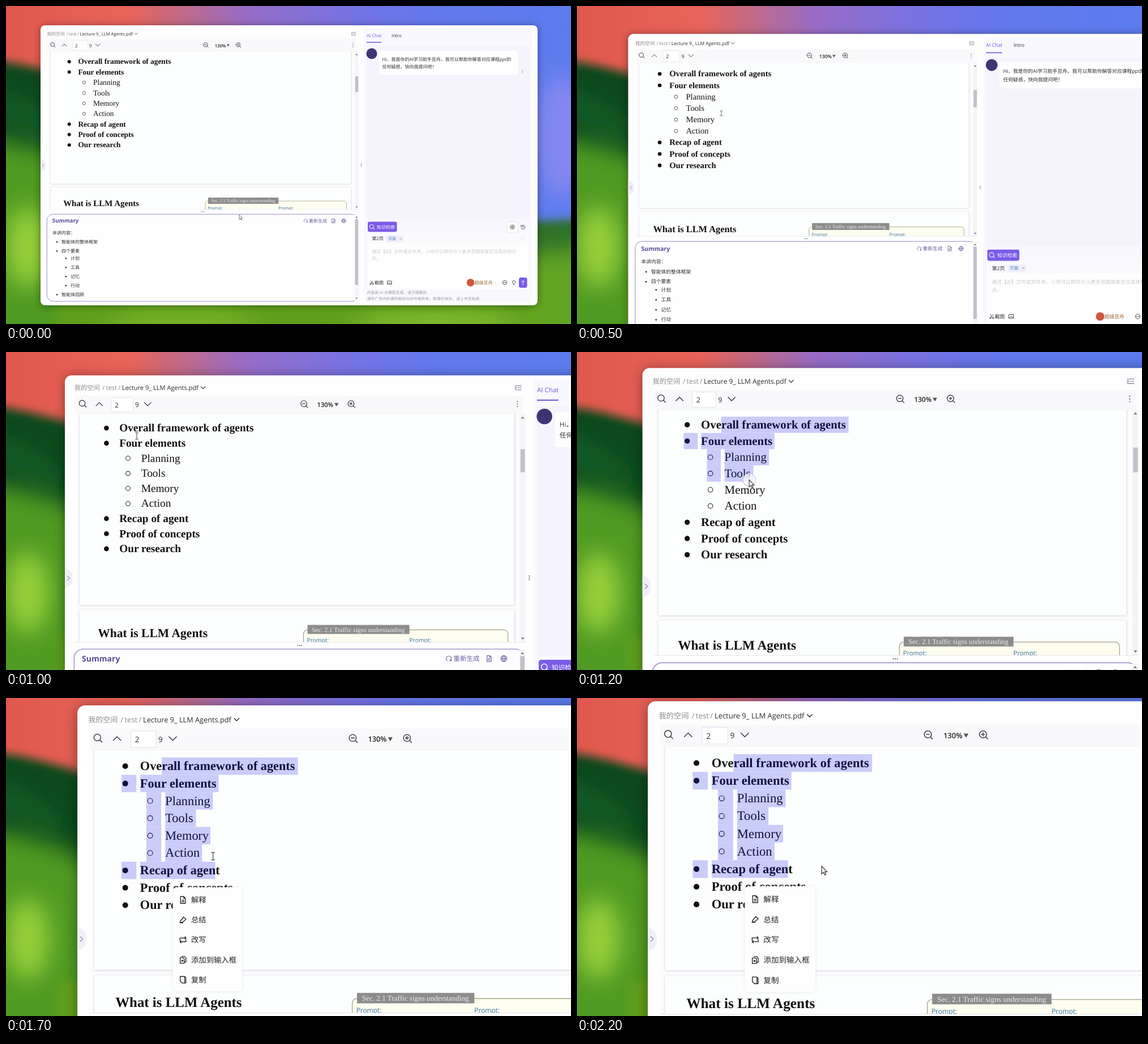
Recreate the animation shown at these times as an HTML page. Size 998 by 561 pixels, loop 2300 ms.

```html
<!DOCTYPE html>
<html lang="zh-CN">
<head>
<meta charset="utf-8">
<title>Reader zoom</title>
<style>
  html, body { margin: 0; width: 100%; height: 100%; overflow: hidden; background: #5f9e1c; }
  svg { position: absolute; left: 0; top: 0; width: 998px; height: 561px; }
  text { white-space: pre; text-rendering: geometricPrecision; }
  .ui { font-family: "Open Sans", "Noto Sans CJK SC", "Noto Sans CJK", sans-serif; }
  .page { font-family: "Liberation Serif", "Times New Roman", serif; fill: #111; }
  .icon { fill: none; stroke-linecap: round; stroke-linejoin: round; }
</style>
</head>
<body>
<svg viewBox="0 0 998 561">
  <defs>
    <linearGradient id="sky">
      <stop offset="0" stop-color="#e0584d"/>
      <stop offset=".22" stop-color="#e8645a"/>
      <stop offset=".32" stop-color="#bd6a8c"/>
      <stop offset=".42" stop-color="#996cc4"/>
      <stop offset=".6" stop-color="#7872e2"/>
      <stop offset=".75" stop-color="#6278ec"/>
      <stop offset="1" stop-color="#5c7cee"/>
    </linearGradient>
    <filter id="b8" x="-50%" y="-50%" width="200%" height="200%"><feGaussianBlur stdDeviation="8"/></filter>
    <filter id="b20" x="-80%" y="-80%" width="260%" height="260%"><feGaussianBlur stdDeviation="20"/></filter>
  </defs>
  <rect width="998" height="561" fill="url(#sky)"/>
  <path d="M-60 92Q60 98 240 170V640H-60Z" fill="#0c4a1f" filter="url(#b8)"/>
  <path d="M-60 150Q40 150 110 235L60 235Q20 190 -60 185Z" fill="#14602a" filter="url(#b20)"/>
  <path d="M-60 235Q50 230 190 310V640H-60Z" fill="#4f9a20" filter="url(#b20)"/>
  <ellipse cx="38" cy="425" rx="38" ry="72" fill="#96d03a" filter="url(#b20)"/>
  <ellipse cx="985" cy="230" rx="50" ry="110" fill="#8487f0" filter="url(#b20)"/>
  <path d="M860 375Q950 385 1060 370V640H860Z" fill="#2f6f2c" filter="url(#b8)"/>
  <path d="M860 440Q950 440 1060 420V640H860Z" fill="#62a524" filter="url(#b20)"/>
  <rect x="90" y="500" width="830" height="120" fill="#5f9e1c" filter="url(#b8)"/>
  <ellipse cx="310" cy="560" rx="130" ry="18" fill="#80b92c" filter="url(#b20)"/>
  <ellipse cx="760" cy="560" rx="150" ry="18" fill="#8ac234" filter="url(#b20)"/>
</svg>
<svg viewBox="0 0 998 561">
  <defs>
    <clipPath id="viewer"><rect x="70" y="81" width="556" height="278"/></clipPath>
    <clipPath id="foot"><rect x="633" y="498" width="300" height="21.5"/></clipPath>
    <filter id="soft" x="-20%" y="-20%" width="140%" height="140%"><feGaussianBlur stdDeviation="1.4"/></filter>
    <filter id="drop" x="-10%" y="-10%" width="120%" height="120%"><feGaussianBlur stdDeviation="7"/></filter>
  </defs>
  <g id="win"></g>
</svg>
<script>
const LOOP = 2300;
const ROW_H = 18.375, ROW_Y = 98;
const PURPLE = "#7b5ce8", VIOLET = "#6d62a0", INK = "#2c2c34", GRAY = "#8b8b92";

// markup helpers; text is placed by its vertical centre
const text = (x, y, s, size = 8, fill = INK, more = "") =>
  `<text class="ui" x="${x}" y="${y + size * .36}" font-size="${size}" fill="${fill}" ${more}>${s}</text>`;
const serif = (x, y, s, size, more = "") =>
  `<text class="page" x="${x}" y="${y}" font-size="${size}" ${more}>${s}</text>`;
const box = (x, y, w, h, fill, more = "") =>
  `<rect x="${x}" y="${y}" width="${w}" height="${h}" fill="${fill}" ${more}/>`;
const dot = (x, y, r, fill = INK, more = "") =>
  `<circle cx="${x}" cy="${y}" r="${r}" fill="${fill}" ${more}/>`;
const icon = (x, y, d, color = INK, width = .8) =>
  `<path class="icon" transform="translate(${x} ${y})" d="${d}" stroke="${color}" stroke-width="${width}"/>`;
const dots = (x, y, dx, dy, color = "#666") =>
  [-1, 0, 1].map(k => dot(x + k * dx, y + k * dy, .7, color)).join("");
const arc = r => `M${-r} 0a${r} ${r} 0 1 1 ${2 * r} 0a${r} ${r} 0 1 1 ${-2 * r} 0`;
const MEDIUM = `font-weight="500"`, BOLD = `font-weight="700"`;

const ICON = {
  down: "M-2.6 -1.3L0 1.3L2.6 -1.3",
  bigDown: "M-4 -2L0 2L4 -2",
  bigUp: "M-4 2L0 -2L4 2",
  right: "M-1.5 -2.6L1.5 0L-1.5 2.6",
  find: "M-4 -.6a3.6 3.6 0 1 1 7.2 0a3.6 3.6 0 1 1 -7.2 0M2.3 2L4.6 4.3",
  doc: "M-2.6 -3.6H.8L2.6 -1.8V3.6H-2.6ZM.8 -3.6V-1.8H2.6M-1.2 .2H1.2M-1.2 1.8H1.2",
  globe: arc(3.6) + "M-3.6 0H3.6M0 -3.6Q-3.4 0 0 3.6Q3.4 0 0 -3.6",
  redo: "M-1.8 2.6A3.1 3.1 0 1 1 1.8 2.6M1.8 2.6L3.3 2.4M1.8 2.6L1.7 1",
  list: "M-3.8 -2.5H3.8M-3.8 2.5H3.8M-.6 0H3.8M-3.8 -.9L-2 0L-3.8 .9",
  cross: "M-1.5 -1.5L1.5 1.5M1.5 -1.5L-1.5 1.5",
  clock: "M-3.2 -1.5A3.6 3.6 0 1 1 -3.2 1.7M-3.6 -2.8L-3.2 -1.3L-1.7 -1.6M0 -1.8V.3H1.6",
  image: "M-3.6 -2.9H3.6V2.9H-3.6ZM-3.2 2.2L-.8 -.2L.8 1.3L1.8 .4L3.4 2",
  bulb: "M-1.1 1.8Q-2.6 .4 -2.6 -1A2.6 2.6 0 0 1 2.6 -1Q2.6 .4 1.1 1.8ZM-1 3.5H1",
  cut: "M-2.2 -3L1.6 2M2.2 -3L-1.6 2M-1.3 2.4a1 1 0 1 1 -2 0a1 1 0 1 1 2 0M3.3 2.4a1 1 0 1 1 -2 0a1 1 0 1 1 2 0",
  pen: "M-3.4 3H-.2M-2.8 1.2L.6 -3L3.2 -.7L-.4 2.4L-2.8 2.6Z",
  swap: "M-3.2 .4V-2H3.2M2 -3.2L3.2 -2L2 -.8M3.2 -.4V2H-3.2M-2 .8L-3.2 2L-2 3.2",
  paste: "M-1.4 -3.6H1.6L3.2 -2V2.2H1.4M-3 -2.2H.2L1.4 -1V3.6H-3ZM-1.6 1H.2M-.7 .1V1.9",
  copy: "M-2.9 -3.5H1.8V3.5H-.6L-2.9 1.4ZM1.8 -2.8H3V3.5H.6",
  send: "M0 3.6V-3.4M-2.7 -.8L0 -3.5L2.7 -.8"
};

// outline rows: label, sub level, right edge of a full highlight
const ROWS = [
  ["Overall framework of agents", 0, 294.5],
  ["Four elements", 0, 210.5],
  ["Planning", 1, 204.4],
  ["Tools", 1, 186.6],
  ["Memory", 1, 201.9],
  ["Action", 1, 193],
  ["Recap of agent", 0, 214.2],
  ["Proof of concepts", 0, 225.8],
  ["Our research", 0, 196]
];
const rowY = i => ROW_Y + i * ROW_H;

function outline() {
  return ROWS.map(([label, sub], i) => {
    const y = rowY(i);
    return sub
      ? dot(138, y + .2, 2.7, "none", `stroke="#222" stroke-width=".7"`) + serif(154, y + 4.4, label, 13.4)
      : dot(111.7, y + .2, 3, "#111") + serif(127.4, y + 4.4, label, 13.33, BOLD);
  }).join("");
}

function highlight(last, edge) {
  if (last < 0) return "";
  return ROWS.slice(0, last + 1).map(([, sub, full], i) => {
    const y = rowY(i) - 9, x0 = i ? (sub ? 154 : 127.5) : 150.3;
    const end = i === last ? Math.min(edge, full) : full;
    const mark = i ? box(sub ? 134 : 107.7, y, 15.8, ROW_H, "#1010e8") : "";
    return mark + box(x0, y, Math.max(0, end - x0), ROW_H, "#1010e8");
  }).join("");
}

function header() {
  const zoom = (x, plus) => icon(x, 69, "M-4.2 -.6a3.7 3.7 0 1 1 7.4 0a3.7 3.7 0 1 1 -7.4 0M2.2 2L4.4 4.2M-2.2 -.6H1.2" + (plus ? "M-.5 -2.3V1.1" : ""));
  return text(72.5, 49, "我的空间", 7.8, GRAY) + text(106.8, 49, "/", 7.8, GRAY) +
    text(111, 49, "test", 7.8, GRAY) + text(126, 49, "/", 7.8, GRAY) +
    text(130.5, 49, "Lecture 9_ LLM Agents.pdf", 7.65) + icon(229.6, 49, ICON.down) +
    icon(614, 49, ICON.list, "#77738f", .7) +
    box(74, 58.5, 546, 22.5, "#f9f9fb") +
    icon(82.5, 68.5, ICON.find) + icon(103, 69, ICON.bigUp) +
    box(117.5, 61, 26.8, 17.5, "#fff", `rx="1.5" stroke="#e0e0ea" stroke-width=".6"`) +
    text(122, 70.2, "2", 8) + text(146.7, 69.8, "9", 8) + icon(162, 69, ICON.bigDown) +
    zoom(353, false) + text(368.7, 69.8, "130%", 7.7, "#222", `font-weight="600"`) +
    `<path d="M389.8 67.6h5l-2.5 4.2z" fill="#555"/>` + zoom(410.5, true) + dots(613, 69, 0, 3);
}

function scrollbar(x, top, bottom, y0, y1) {
  return box(x, top, 7, bottom - top, "#f5f5f8") + box(x + 1, y0, 5.4, y1 - y0, "#c2c1ca") +
    `<path d="M${x + 1.7} ${top + 5.6}h4l-2-2.6zM${x + 1.7} ${bottom - 5.6}h4l-2 2.6z" fill="#777"/>`;
}

function viewer() {
  const sheet = (y, h) => box(79, y + .5, 530.5, h, "#cfcfdc", `filter="url(#soft)"`) + box(79, y, 530, h, "#fdfffe");
  return `<g clip-path="url(#viewer)">` + box(74, 81, 544, 278, "#fdfdfe") +
    sheet(60, 253.6) + sheet(319.5, 80) +
    outline() + `<g id="sel" opacity=".21"></g>` +
    serif(101.2, 352.8, "What is LLM Agents", 14.93, BOLD) +
    box(352, 344, 249.5, 40, "#fdfdf0", `rx="5" stroke="#a3a384" stroke-width=".8"`) +
    box(357, 338, 124.3, 11, "#8c8c8c") +
    serif(362.3, 346.4, "Sec. 2.1 Traffic signs understanding", 7.88, `style="fill:#ececec"`) +
    text(356.3, 356.4, "Prompt:", 7.1, "#34709e") + text(481.3, 356.4, "Prompt:", 7.1, "#34709e") +
    scrollbar(615.8, 81, 359, 124, 152) + `</g>` +
    box(74, 358.8, 549, .6, "#e3e3ec") + dots(347.5, 363, 2.3, 0);
}

function summary() {
  const items = [[0, 416, "智能体的整体框架"], [0, 432, "四个要素"], [1, 445, "计划"], [1, 461, "工具"],
    [1, 477, "记忆"], [1, 493, "行动"], [0, 509, "智能体回顾"]];
  return box(72.3, 367.4, 549.5, 153.6, "#fefefe", `rx="11" stroke="#9288c4" stroke-width=".9"`) +
    scrollbar(615.5, 368, 520, 376, 492) +
    text(81.8, 379, "Summary", 9.7, "#5d4a9e", BOLD) +
    icon(529.3, 379, ICON.redo, VIOLET) + text(535, 379, "重新生成", 8, VIOLET) +
    icon(578.5, 379, ICON.doc, VIOLET) + icon(596.5, 379, ICON.globe, VIOLET) +
    text(82, 400, "本讲内容：") +
    items.map(([sub, y, s]) => dot(90 + 16 * sub, y + .3, 1.3) + text(98 + 16 * sub, y, s)).join("");
}

function chat() {
  const ask = "#c9c9cf", note = "#9c9ca4";
  return box(633, 39, 295, 484, "#f9f8fe", `rx="4"`) + box(637, 72, 288, 304, "#f5f4fd") +
    text(637, 52, "AI Chat", 7.9, "#6f5ce0") + box(637, 63.4, 26, 1.5, "#6f5ce0") + text(681, 52, "Intro", 7.9) +
    dot(646, 84, 9.5, "#3d3474") +
    box(658.8, 79, 245.5, 42.5, "#fefefe", `rx="3"`) +
    text(664.5, 94, "Hi，我是你的AI学习助手豆舟。我可以帮助你解答对应课程ppt的", 8, INK, MEDIUM) +
    text(664.5, 107, "任何疑惑，快向我提问吧！", 8, INK, MEDIUM) + dots(912.5, 115, 0, 2.3, "#888") +
    box(639, 380.5, 51.5, 18, PURPLE, `rx="3"`) + icon(646.2, 389.7, ICON.find, "#fff", 1) +
    text(655, 389.7, "知识检索", 8, "#fff", MEDIUM) +
    box(885, 380, 19.5, 20, "#fefefe", `rx="4" stroke="#dcdae8" stroke-width=".7"`) +
    icon(894.5, 390, arc(3.6) + "M-1.8 0H1.8M0 -1.8V1.8") + icon(913, 390, ICON.clock) +
    box(639, 402, 283, 97.5, "#fefefe", `rx="3"`) + box(641, 402.5, 279, 16.5, "#fafafd") +
    text(646.5, 410.5, "第2页") + box(672, 404.5, 30, 12, "#f0effa", `rx="2"`) +
    text(675, 410.5, "页面", 7, "#5680c8") + icon(697, 410.5, ICON.cross, GRAY, .6) +
    icon(912, 410, ICON.down, "#c4c4d4", .7) +
    text(646, 433, "通过【@】文件或文件夹，小舟可以帮你引入更多范围或者定位具体知识", 8, ask) + text(646, 445, "点。", 8, ask) +
    icon(646, 488, ICON.cut) + text(651, 488, "截图", 8, INK, MEDIUM) + icon(677.5, 488, ICON.image) +
    dot(820.5, 488, 6.8, "#d2553c") + text(827.5, 488, "超级豆舟", 8, "#99642c") +
    icon(864, 488, ICON.down, "#d4d4d8", .6) +
    icon(881, 488, arc(3.7)) + dots(881, 488, 1.8, 0, INK) + icon(897, 488, ICON.bulb) +
    box(906, 479, 14.5, 18, PURPLE, `rx="3.5"`) + icon(913.2, 488, ICON.send, "#fff", .9) +
    `<g clip-path="url(#foot)">` + text(637.5, 506, "内容由 AI 大模型生成，请仔细甄别", 6.87, note) +
    text(637.5, 517, "课件广场内的课件版权归创作者所有，若需好体验，请上传至私库", 6.87, note) + `</g>`;
}

function menu() {
  const items = [["doc", "解释"], ["pen", "总结"], ["swap", "改写"], ["paste", "添加到输入框"], ["copy", "复制"]];
  return `<g id="menu">` + box(162, 226.5, 73.5, 110, "#c4c4d2", `rx="4" opacity=".45" filter="url(#soft)"`) +
    box(162, 226.3, 73.5, 110, "#fefefe", `rx="4"`) +
    items.map(([name, label], i) => {
      const y = 239.7 + i * 21.1;
      return icon(172.8, y, ICON[name], "#222") + text(181.4, y, label, 8, "#222", MEDIUM);
    }).join("") + `</g>`;
}

const pointer = `<g id="cursor">` +
  dot(0, 0, 7.3, "#fff", `id="ring" fill-opacity=".7" stroke="#b4b4be" stroke-width=".6"`) +
  `<path id="arrow" d="M0 0V8L1.9 6.3L3.2 9.1L4.5 8.5L3.2 5.8H5.6Z" fill="#fff" stroke="#333" stroke-width=".7"/>` +
  `<path id="beam" class="icon" d="M-1.7 -4H-.5L0 -3.6L.5 -4H1.7M0 -3.6V3.6M-1.7 4H-.5L0 3.6L.5 4H1.7" stroke="#444" stroke-width=".7"/></g>`;

const $ = id => document.getElementById(id);
$("win").innerHTML =
  box(61, 35, 878, 494, "#000", `rx="8" opacity=".38" filter="url(#drop)"`) +
  box(61, 34, 878, 494, "#fefefe", `rx="8"`) +
  header() + viewer() + summary() + chat() +
  `<path d="M61 268.5Q70.5 271 70.5 281T61 293.5Z" fill="#f0eff8"/>` + icon(65.4, 281, ICON.right, "#85829c", .7) +
  dots(627.5, 280.5, 0, 2.2) + menu() + pointer;

// smooth monotone curve through [step, ...values] keys
function track(keys) {
  const slope = (k, c) => {
    k = Math.max(0, Math.min(keys.length - 2, k));
    return (keys[k + 1][c] - keys[k][c]) / (keys[k + 1][0] - keys[k][0]);
  };
  const blend = (a, b) => a * b > 0 ? 2 * a * b / (a + b) : 0;
  return step => {
    let k = 0;
    while (k < keys.length - 2 && step > keys[k + 1][0]) k++;
    const a = keys[k], b = keys[k + 1], h = b[0] - a[0], u = (step - a[0]) / h, v = 1 - u;
    return a.slice(1).map((p, j) => {
      const c = j + 1, s = slope(k, c);
      const m0 = blend(slope(k - 1, c), s), m1 = blend(s, slope(k + 1, c));
      return p * (1 + 2 * u) * v * v + b[c] * u * u * (3 - 2 * u) + h * u * v * (m0 * v - m1 * u);
    });
  };
}

// window left, top, scale
const camera = track([[0, 61, 34, 1], [2, 77, 42.4, 1], [6, 100, 53, 1.272], [8, 104, 41.3, 1.448],
  [12, 125, 18, 1.632], [16, 126.5, 9.4, 1.689], [18, 125, 5.8, 1.697]]);
const mouse = track([[0, 412, 368.5], [2, 309, 237.5], [6, 153, 118], [8, 148.7, 107.7], [9, 150.3, 99],
  [11, 212, 222], [12, 201.8, 191], [16, 211.6, 198.2], [18, 242, 205.5]]);
// from step: last highlighted row, its right edge
const SELECT = [[0, -1, 0], [10, 3, 190], [11, 7, 225.8], [13, 6, 207]];

// steps last 100 ms, every fifth one 200 ms
function stepAt(t) {
  const q = Math.floor(t % 600 / 100);
  return 5 * Math.floor(t / 600) + (q < 2 ? q : q - 1);
}

const show = (id, on) => $(id).setAttribute("visibility", on ? "visible" : "hidden");
let shown = -1;

function draw(step) {
  const [x, y, s] = camera(step), [mx, my] = mouse(step);
  $("win").setAttribute("transform", `translate(${x} ${y}) scale(${s}) translate(-61 -34)`);
  $("cursor").setAttribute("transform", `translate(${mx} ${my})`);
  const beam = step >= 4 && step < 10 || step >= 14 && step < 17;
  show("beam", beam);
  show("arrow", !beam);
  show("ring", step >= 10 && step < 13);
  show("menu", step >= 14);
  const [, last, edge] = SELECT.filter(r => r[0] <= step).pop();
  $("sel").innerHTML = highlight(last, edge);
}

function tick() {
  const step = stepAt(performance.now() % LOOP);
  if (step !== shown) draw(shown = step);
  requestAnimationFrame(tick);
}
tick();
</script>
</body>
</html>
```
